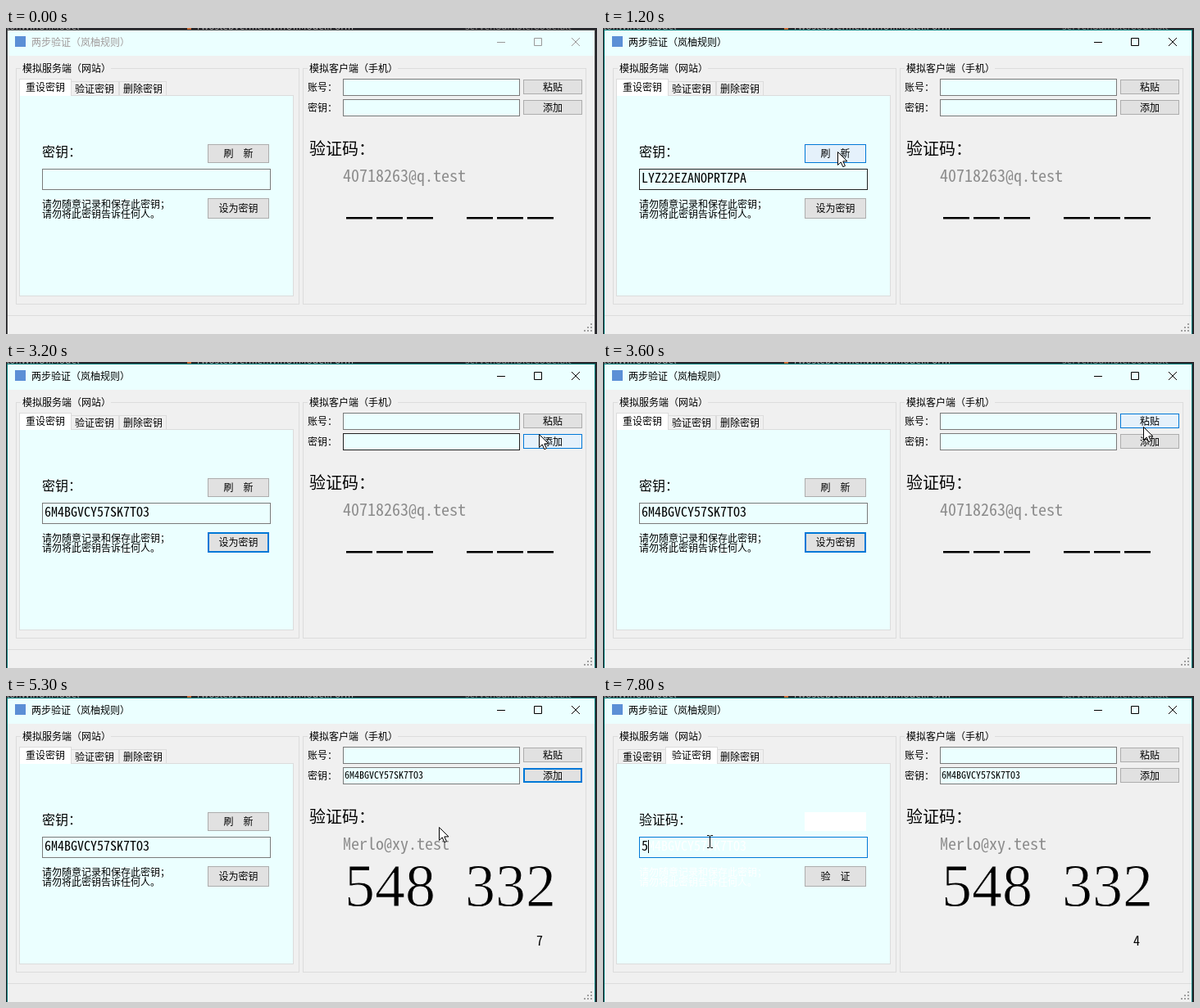
These frames come from a looping animation (721x374 px, 8000 ms). An HTML page:

```html
<!DOCTYPE html>
<html lang="zh-CN">
<head>
<meta charset="utf-8">
<title>两步验证</title>
<style>
html, body { margin: 0; width: 100%; height: 100%; overflow: hidden; background: #f0f0f0; }
svg { display: block; width: 721px; height: 374px; }
text { font-family: "Noto Sans CJK SC", "Noto Sans CJK", sans-serif; white-space: pre; }
.mono { font-family: "Noto Sans Mono CJK SC", "Noto Sans Mono", "Liberation Mono", monospace; font-weight: 300; }
.digits { font-family: "Liberation Serif", "Noto Serif", serif; stroke: #f0f0f0; stroke-width: 1; }
</style>
</head>
<body>
<svg id="stage" viewBox="0 0 721 374"></svg>
<script>
const LOOP = 8000, STEP = 100;
const PALE = '#ebffff', BLUE = '#0078d7', LINE = '#dcdcdc', DARK = '#25252a';
const KEY = '6M4BGVCY57SK7TO3';

// Pointer waypoints: time, x, y
const PATH = [
  [200, 600, 372], [600, 430, 290], [1000, 293, 177], [1100, 286, 151],
  [1700, 286, 151], [2200, 297, 226], [2600, 297, 228], [3000, 600, 100],
  [3200, 650, 88], [3500, 657, 86], [3700, 661, 72], [3900, 662, 73],
  [4100, 664, 90], [4900, 664, 90], [5300, 528, 160], [5600, 240, 150],
  [5800, 112, 74], [6000, 112, 75], [6500, 133, 178], [6700, 130, 178]
];

// Controls: x, y, width, height
const BUTTON = {
  refresh: [246, 142, 75, 23],
  apply: [246, 208, 75, 25],
  paste: [631, 63, 72, 18],
  add: [631, 88, 72, 18]
};
const FIELD = {
  main: [44, 172, 279, 26],
  account: [411, 62, 216, 21],
  secret: [411, 87, 216, 21]
};

function pointer(t) {
  if (t < PATH[0][0]) return null;
  const i = PATH.findIndex(p => p[0] > t);
  if (i < 0) return PATH[PATH.length - 1].slice(1);
  const [t0, x0, y0] = PATH[i - 1], [t1, x1, y1] = PATH[i];
  const k = (t - t0) / (t1 - t0);
  return [Math.round(x0 + (x1 - x0) * k), Math.round(y0 + (y1 - y0) * k)];
}

function inside(p, [x, y, w, h]) {
  return p && p[0] >= x && p[0] < x + w && p[1] >= y && p[1] < y + h;
}

// Value of the last entry whose time has come
function at(t, list) {
  return list.reduce((value, [start, next]) => t >= start ? next : value, '');
}

function box([x, y, w, h], fill, stroke = 'none', lw = 1) {
  return `<rect x="${x + lw / 2}" y="${y + lw / 2}" width="${w - lw}" height="${h - lw}"
    fill="${fill}" stroke="${stroke}" stroke-width="${lw}"/>`;
}

function fillRect(x, y, w, h, color) {
  return `<rect x="${x}" y="${y}" width="${w}" height="${h}" fill="${color}"/>`;
}

function path(d, stroke, fill = 'none') {
  return `<path d="${d}" stroke="${stroke}" fill="${fill}"/>`;
}

function text(x, y, str, size = 12, color = '#000', extra = '') {
  return `<text x="${x}" y="${y}" font-size="${size}" fill="${color}" ${extra}>${str}</text>`;
}

function mono(x, y, str, size, color) {
  return text(x, y, str, size, color, 'class="mono"');
}

function button(rect, label, hot, focused) {
  const [x, y, w, h] = rect;
  return box(rect, hot ? '#e5f1fb' : '#e1e1e1', hot || focused ? BLUE : '#adadad', focused && !hot ? 2 : 1)
    + text(x + w / 2, y + h / 2 + 4.5, label, 12, '#000', 'text-anchor="middle"');
}

// The hover border fades, so it trails the pointer
function field(rect, t, focused) {
  const hot = inside(pointer(t - 200), rect);
  return box(rect, PALE, focused ? BLUE : hot ? '#222' : '#7a7a7a');
}

function group(x, w, label, labelWidth) {
  return box([x, 49, w, 289], 'none', LINE)
    + fillRect(x + 6, 47, labelWidth, 5, '#f0f0f0') + text(x + 8, 53.5, label);
}

function frame(active) {
  const ink = active ? '#000' : '#999';
  let out = fillRect(0, 0, 721, 374, DARK)
    + '<svg width="721" height="2">'
    + text(0, 2, 'tor.WinUI.Model', 12, '#aaa') + fillRect(221, 0, 5, 2, '#c96a35')
    + text(231, 2, 'TwostepVerifier.WinUI.Model.Form', 12, '#aaa')
    + text(560, 2, 'server.Sample.Code.txt', 12, '#888') + '</svg>'
    + box([1, 2, 718, 373], '#f0f0f0', active ? '#0a7f7c' : '#4a4a4a')
    + fillRect(2, 3, 716, 31, PALE)
    + fillRect(11, 10, 13, 13, '#5b8fd6')
    + text(31, 22, '两步验证（岚柚规则）', 12, active ? '#000' : '#a09a9a')
    + path('M599 17.5h10M644.5 12.5h9v9h-9zM690 12l10 10M700 12l-10 10', ink)
    + path('M2 351.5H718', LINE);
  for (let r = 0; r < 3; r++)
    for (let c = 0; c <= r; c++) out += fillRect(713 - 4 * c, 361 + 4 * r, 2, 2, '#a0a0a0');
  return out;
}

function tabs(selected, p) {
  const labels = ['重设密钥', '验证密钥', '删除密钥'];
  const lefts = [18, 79, 138], widths = [61, 59, 58], inks = [24, 84, 143];
  let out = '';
  labels.forEach((label, i) => {
    const rect = [lefts[i], 65, widths[i], 18];
    if (i !== selected) out += box(rect, inside(p, rect) ? '#d8eaf9' : '#f0f0f0', LINE) + text(inks[i], 79, label);
  });
  out += box([16, 82, 335, 246], PALE, LINE);
  const x = selected ? 76 : 16;
  return out + box([x, 62, 64, 21], '#fff', LINE) + fillRect(x + 1, 81, 62, 2, '#fff')
    + text(inks[selected], 77, labels[selected]);
}

function notes(color) {
  return text(44, 219.5, '请勿随意记录和保存此密钥；', 12, color)
    + text(44, 231.5, '请勿将此密钥告诉任何人。', 12, color);
}

function server(t, p, focus) {
  const verify = t >= 5900;
  let out = group(12, 346, '模拟服务端（网站）', 110) + tabs(verify ? 1 : 0, p);
  if (!verify) {
    const key = at(t, [[1100, 'LYZ22EZANOPRTZPA'], [1400, 'QH3WK7DB2XNV5TUJ'], [1600, KEY]]);
    return out + text(44, 157, '密钥：', 16)
      + button(BUTTON.refresh, '刷　新', inside(p, BUTTON.refresh), focus === 'refresh')
      + field(FIELD.main, t) + mono(47, 189, key, 16)
      + notes('#000')
      + button(BUTTON.apply, '设为密钥', inside(p, BUTTON.apply), focus === 'apply');
  }
  out += text(44, 157, '验证码：', 16) + box(BUTTON.refresh, '#fff', '#fff')
    + field(FIELD.main, t, t >= 6800) + mono(47, 189, KEY, 16, '#fff') + notes('#fff')
    + button(BUTTON.apply, '验　证', inside(p, BUTTON.apply), false);
  if (t >= 7500) out += mono(47, 189, '5', 16);
  if (t >= 7000) out += fillRect(t >= 7500 ? 55 : 47, 176, 1, 16, '#000');
  return out;
}

function client(t, p, focus) {
  const added = t >= 4500;
  let out = group(362, 346, '模拟客户端（手机）', 110)
    + text(368, 76.5, '账号：') + text(368, 101.5, '密钥：')
    + field(FIELD.account, t) + field(FIELD.secret, t)
    + button(BUTTON.paste, '粘贴', inside(p, BUTTON.paste), focus === 'paste')
    + button(BUTTON.add, '添加', inside(p, BUTTON.add), focus === 'add')
    + text(370, 155, '验证码：', 20)
    + mono(411, 188, added ? 'Merlo@xy.test' : '40718263@q.test', 20, '#8c8c8c');
  if (t >= 3800) out += mono(413, 101, KEY, 12);
  if (added) {
    const seconds = at(t, [[4500, '7'], [5400, '6'], [6400, '5'], [7300, '4']]);
    out += text(413, 257, '548', 74, '#000', 'class="digits"')
      + text(560, 257, '332', 74, '#000', 'class="digits"')
      + mono(647, 305, seconds, 16);
  } else {
    for (const x of [415, 562])
      for (let i = 0; i < 3; i++) out += fillRect(x + 37 * i, 231, 32, 2.5, '#000');
  }
  return out;
}

function cursor(t, p) {
  if (!p || (t >= 7500 && t < 7800)) return '';
  const beam = Object.values(FIELD).some(rect => inside(p, rect));
  const shape = beam
    ? path('M-3 -7.5h2.5l1 1l1 -1h2.5M.5 -7v14M-3 7.5h2.5l1 -1l1 1h2.5', '#000')
    : path('M.5 .5v16l3.7 -3.6l2.6 5.8l2.6 -1.2l-2.6 -5.6h5.2z', '#000', '#fff');
  return `<g transform="translate(${p})">${shape}</g>`;
}

function scene(t) {
  const p = pointer(t);
  const focus = at(t, [[1100, 'refresh'], [2400, 'apply'], [3800, 'paste'], [4500, 'add'], [5900, 'tabs']]);
  return frame(t >= 1000) + server(t, p, focus) + client(t, p, focus) + cursor(t, p);
}

const stage = document.getElementById('stage');
const start = performance.now();
let shown = -1;

function tick() {
  const elapsed = (performance.now() - start) % LOOP;
  const t = Math.floor(elapsed / STEP) * STEP;
  if (t !== shown) {
    stage.innerHTML = scene(t);
    shown = t;
  }
  requestAnimationFrame(tick);
}
tick();
</script>
</body>
</html>
```
